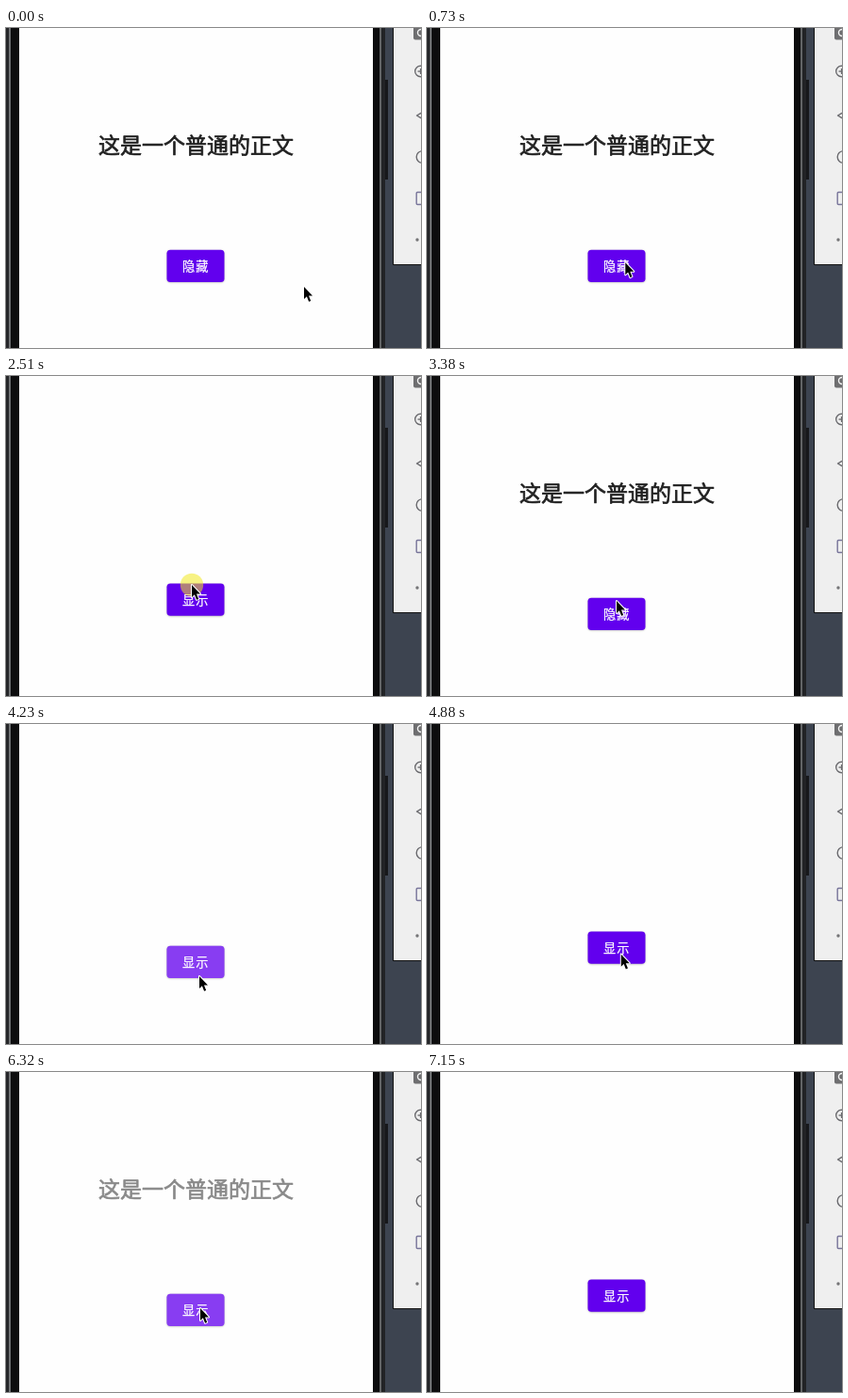
Recreate the animation shown at these times as an HTML page with a canvas. Size 440 by 340 pixels, loop 7.37 s.

```html
<!DOCTYPE html>
<html lang="zh">
<head>
<meta charset="utf-8">
<title>Visibility toggle</title>
<style>
  html, body { margin: 0; width: 100%; height: 100%; overflow: hidden; background: #fefefe; }
  canvas { display: block; width: 440px; height: 340px; }
</style>
</head>
<body>
<canvas id="stage"></canvas>
<script>
const LOOP = 7370;
const FONT = '"Noto Sans CJK SC", "Noto Sans CJK", sans-serif';
const canvas = document.getElementById('stage');
const dpr = window.devicePixelRatio || 1;
canvas.width = 440 * dpr;
canvas.height = 340 * dpr;
const ctx = canvas.getContext('2d');
ctx.scale(dpr, dpr);
ctx.lineJoin = 'round';

// Pointer tip: time, x, y
const PATH = [
  [20, 316, 275], [90, 335, 278], [230, 335, 278], [620, 203, 242],
  [800, 214, 253], [2150, 214, 253], [2500, 197, 222], [2850, 197, 222],
  [3380, 201, 239], [3540, 202, 247], [3860, 202, 247], [4130, 205, 268],
  [4400, 205, 268], [5090, 206, 238], [5530, 206, 238], [5930, 206, 251],
  [6400, 206, 251], [6970, 391, 322], [7150, 395, 342]
];

const PRESSES = [
  { down: 980, full: 1270, up: 1410, fade: 1560, end: 1810, lift: 1 },
  { down: 2650, full: 2850, up: 2850, fade: 3050, end: 3300, lift: 1 },
  { down: 3600, full: 3800, up: 3860, fade: 4400, end: 4700, lift: 1 },
  { down: 5210, full: 5400, up: 5300, fade: 5550, end: 5850, lift: 1 },
  { down: 5970, full: 6070, up: 6240, fade: 6400, end: 6700, lift: 0 }
];
const GLOWS = [[980, 1200], [2490, 2700], [3580, 3780], [5210, 5400], [5970, 6070]];

// Text toggles; a hidden text frees its space only at "jump"
const TOGGLES = [
  { at: 1420, show: false, jump: 1800 },
  { at: 2850, show: true },
  { at: 3860, show: false, jump: 4400 },
  { at: 5300, show: true },
  { at: 6240, show: false, jump: 6680 }
];

const ramp = (t, a, b) => Math.min(1, Math.max(0, (t - a) / (b - a)));
const smooth = p => p * p * (3 - 2 * p);

// Critically damped spring: share of the way still to go
function rest(ms) {
  const k = 0.02 * Math.max(0, ms);
  return (1 + k) * Math.exp(-k);
}

function pointer(t) {
  if (t <= PATH[0][0]) return PATH[0].slice(1);
  for (let i = 1; i < PATH.length; i++) {
    const a = PATH[i - 1], b = PATH[i];
    if (t <= b[0]) {
      const p = smooth(ramp(t, a[0], b[0]));
      return [a[1] + (b[1] - a[1]) * p, a[2] + (b[2] - a[2]) * p];
    }
  }
  return null;
}

function layout(t) {
  const last = TOGGLES.filter(g => t >= g.at).pop();
  if (!last) return { label: '隐藏', alpha: 1, shrink: 0 };
  const r = rest(t - last.at);
  if (last.show) return { label: '隐藏', alpha: 1 - r, shrink: r };
  const gone = t >= last.jump;
  return { label: '显示', alpha: gone ? 0 : r, shrink: gone ? 1 : 0 };
}

function rect(x, y, w, h, fill) {
  ctx.fillStyle = fill;
  ctx.fillRect(x, y, w, h);
}

function roundPath(x, y, w, h, r) {
  ctx.beginPath();
  ctx.roundRect(x, y, w, h, r);
}

function disc(x, y, r, fill) {
  ctx.beginPath();
  ctx.arc(x, y, r, 0, Math.PI * 2);
  ctx.fillStyle = fill;
  ctx.fill();
}

function poly(points) {
  ctx.beginPath();
  points.forEach(([x, y]) => ctx.lineTo(x, y));
  ctx.closePath();
}

function ring(x, y, r) {
  ctx.beginPath();
  ctx.arc(x, y, r, 0, Math.PI * 2);
  ctx.stroke();
}

// Fill plus a thin outline gives a medium weight
function mediumText(text, x, y, size, color, outline) {
  ctx.font = `500 ${size}px ${FONT}`;
  ctx.fillStyle = ctx.strokeStyle = color;
  ctx.lineWidth = outline;
  ctx.strokeText(text, x, y);
  ctx.fillText(text, x, y);
}

function drawPhone() {
  rect(0, 0, 440, 340, '#fefefe');
  rect(0, 0, 14, 340, '#0d0d0e');
  rect(0, 0, 3, 340, '#26272a');
  rect(3, 0, 2, 340, '#707274');
  rect(389, 0, 51, 340, '#3d4450');
  rect(389, 0, 7, 340, '#0d0d0e');
  rect(396, 0, 2, 340, '#626466');
  rect(398, 0, 4, 340, '#222326');
  rect(402, 55, 3, 106, '#17181b');
}

function drawPanel() {
  rect(410, 0, 30, 252, '#111');
  rect(411, 0, 29, 251, '#efefef');
  roundPath(432, -3, 16, 15.5, 2);
  ctx.fillStyle = '#6e6e70';
  ctx.fill();
  ctx.lineWidth = 1.4;
  ctx.strokeStyle = '#f4f4f4';
  ring(440, 5, 3.5);
  ctx.strokeStyle = '#6a6a6e';
  ring(439.5, 46, 5.8);
  rect(436.5, 45.4, 6, 1.3, '#6a6a6e');
  rect(438.9, 43, 1.3, 6, '#6a6a6e');
  poly([[435.5, 93], [445, 87.5], [445, 98.5]]);
  ctx.stroke();
  ring(441.5, 137, 6.3);
  ctx.strokeStyle = '#77749a';
  roundPath(435.2, 174.5, 13, 13, 1);
  ctx.stroke();
  disc(436, 225, 1.7, '#747476');
}

function drawText({ alpha, shrink }) {
  if (alpha < 0.01) return;
  ctx.save();
  ctx.beginPath();
  ctx.rect(90, 108, 230, 31 - 30 * shrink);
  ctx.clip();
  const grey = Math.round(254 - 222 * alpha);
  mediumText('这是一个普通的正文', 98, 132.6, 23, `rgb(${grey},${grey},${grey})`, 0.7);
  ctx.restore();
}

function drawButton(t, { label, shrink }) {
  const x = 170.5, y = 235.7 - 15.2 * shrink, w = 61, h = 34.3;
  const press = PRESSES.find(p => t >= p.down && t < p.end);
  const lift = press ? press.lift * ramp(t, press.down, press.down + 130)
    * (1 - ramp(t, press.up + 20, press.up + 120)) : 0;

  ctx.save();
  ctx.shadowColor = 'rgba(0,0,0,0.28)';
  ctx.shadowBlur = (2 + 6 * lift) * dpr;
  ctx.shadowOffsetY = (0.6 + 3.2 * lift) * dpr;
  roundPath(x, y, w, h, 3.8);
  ctx.fillStyle = '#6200ee';
  ctx.fill();
  ctx.restore();

  if (press) {
    const [px, py] = pointer(press.down);
    const grow = smooth(ramp(t, press.down, press.full));
    ctx.save();
    roundPath(x, y, w, h, 3.8);
    ctx.clip();
    const alpha = 0.24 * (1 - ramp(t, press.fade, press.end));
    disc(px, py, 10 + 60 * grow, `rgba(255,255,255,${alpha})`);
    ctx.restore();
  }

  ctx.letterSpacing = '1.1px';
  mediumText(label, 187, y + 22.2, 13.2, '#fff', 0.25);
  ctx.letterSpacing = '0px';
}

function drawPointer(t) {
  const tip = pointer(t);
  if (!tip) return;
  const [x, y] = tip;
  if (GLOWS.some(([a, b]) => t >= a && t < b)) {
    disc(x, y, 12.2, 'rgba(240,232,30,0.55)');
  }
  ctx.save();
  ctx.translate(x, y);
  poly([[0, 0], [0, 13], [2.9, 10.3], [5.1, 15.8], [7.2, 14.9], [5, 9.5], [9, 9.5]]);
  ctx.lineWidth = 2;
  ctx.strokeStyle = '#fff';
  ctx.stroke();
  ctx.fillStyle = '#000';
  ctx.fill();
  ctx.restore();
}

function draw(t) {
  const state = layout(t);
  drawPhone();
  drawPanel();
  drawText(state);
  drawButton(t, state);
  drawPointer(t);
}

let start;
function tick(now) {
  start ??= now;
  draw((now - start) % LOOP);
  requestAnimationFrame(tick);
}
draw(0);
requestAnimationFrame(tick);
</script>
</body>
</html>
```
